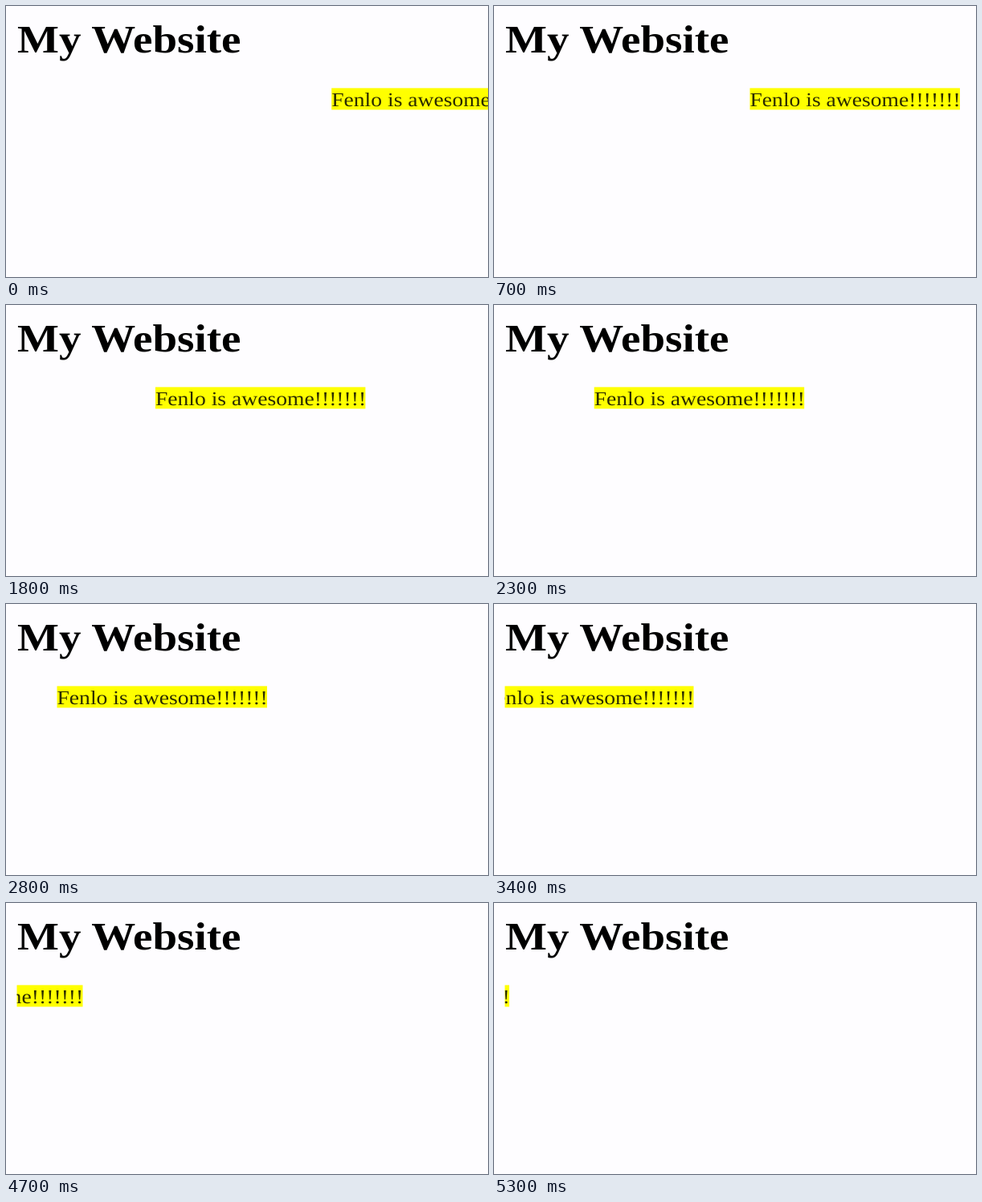
An HTML page that plays this animation: 600x338 px, repeating every 5.4 s.

```html
<!DOCTYPE html>
<html lang="en">
<head>
<meta charset="utf-8">
<title>My Website</title>
<style>
  html, body { margin: 0; width: 100%; height: 100%; overflow: hidden; background: #fefdff; }
  svg { display: block; }
  text { font-family: "Liberation Serif", "Times New Roman", serif; text-rendering: geometricPrecision; }
  .title { font-size: 48.8px; font-weight: bold; }
  .message { font-size: 24.5px; fill: #2c2c00; }
</style>
</head>
<body>
<svg width="600" height="338">
  <!-- The page is shown with slightly wide pixels -->
  <text class="title" transform="translate(14 58) scale(1.127 1)">My Website</text>
  <!-- The nested svg clips the marquee at the page margin -->
  <svg x="13.5" width="586.5" height="338">
    <g id="marquee">
      <rect y="102.4" width="261.5" height="27" fill="#ff0"/>
      <text class="message" transform="translate(0 124.8) scale(1.127 1)">Fenlo is awesome!!!!!!!</text>
    </g>
  </svg>
</svg>
<script>
  const TICK = 100, TICKS = 54, STEP = 5.1, START = 391.7;
  // [tick, steps scrolled]: the marquee timer runs slightly unevenly
  const pace = [[0, 0], [7, 17], [14, 34], [23, 55], [34, 82], [42, 100], [53, 127]];
  const marquee = document.getElementById('marquee');

  function stepsAt(tick) {
    const i = Math.max(1, pace.findIndex(([end]) => tick <= end));
    const [t0, s0] = pace[i - 1], [t1, s1] = pace[i];
    return Math.floor(s0 + (s1 - s0) * (tick - t0) / (t1 - t0) + 0.25);
  }

  function draw() {
    const tick = Math.floor(performance.now() / TICK) % TICKS;
    marquee.setAttribute('transform', `translate(${START - STEP * stepsAt(tick)} 0)`);
    requestAnimationFrame(draw);
  }
  draw();
</script>
</body>
</html>
```
